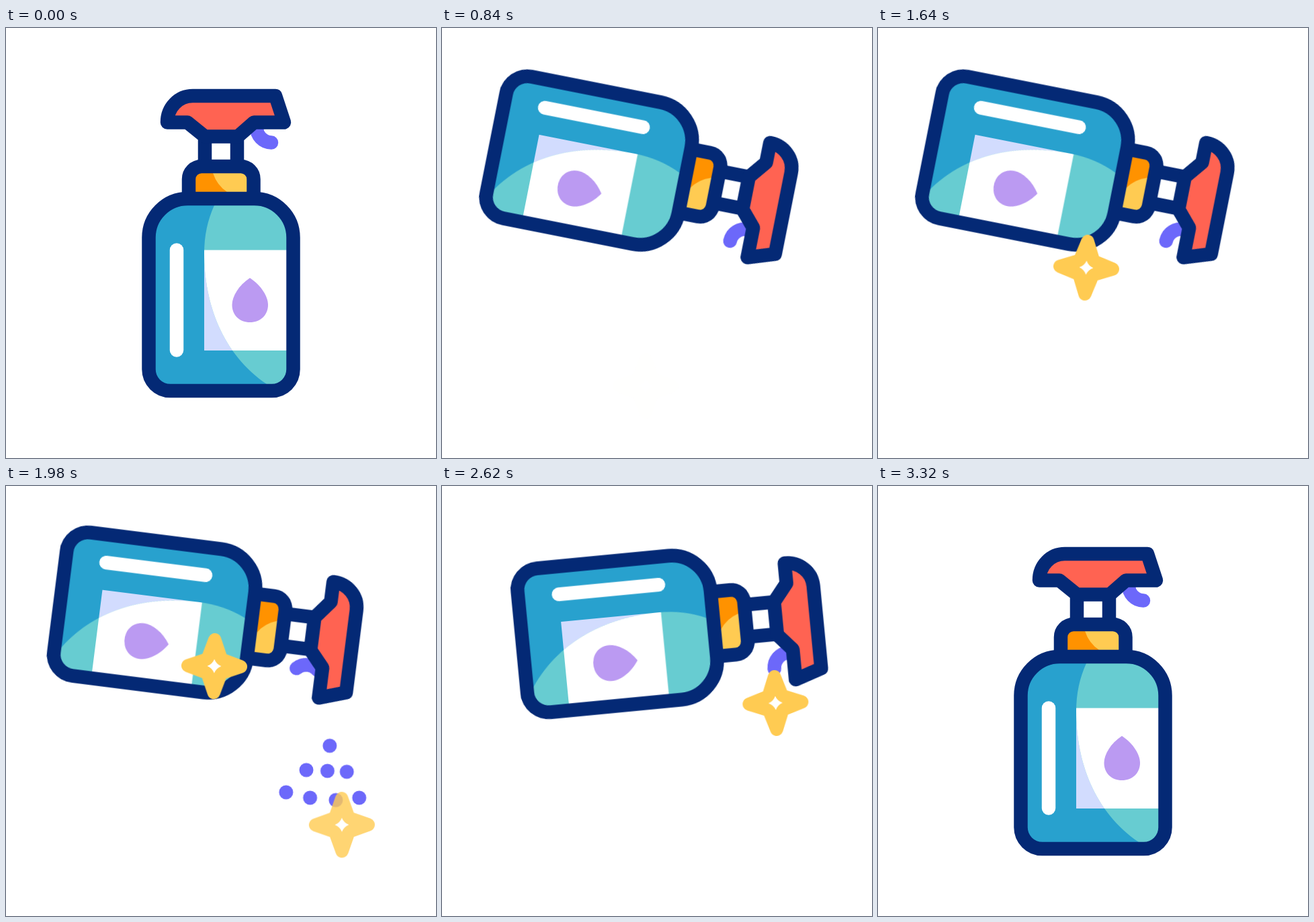
An HTML page that plays this animation: 640x640 px, repeating every 3600 ms.

```html
<!DOCTYPE html>
<html lang="en">
<head>
<meta charset="utf-8">
<title>Spray bottle</title>
<style>
  html, body { margin: 0; width: 100%; height: 100%; overflow: hidden; background: #fff; }
  svg { display: block; width: 100vw; height: 100vh; }

  .outline { fill: none; stroke: #042975; stroke-width: 20.5; stroke-linejoin: round; }
  .bottle, .trigger, .star, .dots circle { animation: 3600ms linear infinite; }

  .bottle {
    transform-origin: 320px 537px;
    animation-name: tip;
    animation-timing-function: ease-in-out;
  }
  @keyframes tip {
    0%, 84.778%, 100% { transform: translate(0, 0) rotate(0deg); }
    16.667%, 23.333%, 36.111%, 47.222%, 60%, 68.111% {
      transform: translate(-236.2px, -364.7px) rotate(101.2deg);
    }
    28.889%, 52.778% { transform: translate(-236.2px, -364.7px) rotate(96.2deg); }
  }

  .trigger {
    transform-origin: 374px 148px;
    animation-name: squeeze;
    animation-timing-function: ease-in-out;
  }
  @keyframes squeeze {
    0%, 23.333%, 37.222%, 47.222%, 61.111%, 100% { transform: rotate(0deg); }
    27.778%, 32.778%, 51.667%, 56.667% { transform: rotate(42deg); }
  }

  .dots circle { fill: #6c68fa; animation-name: spray; }
  @keyframes spray {
    0%, 24.43%, 39.444%, 48.32%, 63.333%, 100% {
      transform: translate(var(--x), calc(var(--y) + 62px)) scale(0);
    }
    24.444%, 48.333% { transform: translate(487px, 316px) scale(1); }
    32.222%, 56.111% { transform: translate(var(--x), var(--y)) scale(1); }
  }

  .star { fill: #fff; stroke: #ffcb52; stroke-width: 19.4; stroke-linejoin: round; }
  .left { animation-name: rise-left, fade-left; }
  .right { animation-name: rise-right, fade-right; }
  @keyframes rise-left {
    0%, 23.333% { transform: translate(303px, 533px) rotate(0deg); }
    32.222% { transform: translate(304px, 462.5px) rotate(1.5deg); }
    45.556% { transform: translate(310px, 357px) rotate(3deg); }
    63.889% { transform: translate(310px, 185px) rotate(-.8deg); }
    67.222%, 100% { transform: translate(310px, 152px) rotate(-1.5deg); }
  }
  @keyframes fade-left {
    0%, 23.333%, 67.222%, 100% { opacity: 0; }
    26.111%, 60.556% { opacity: 1; }
  }
  @keyframes rise-right {
    0%, 52.778% { transform: translate(500px, 528px) rotate(0deg); }
    63.889% { transform: translate(499.5px, 411px) rotate(-1.5deg); }
    78.333% { transform: translate(494.5px, 268.5px) rotate(-3deg); }
    92.222%, 100% { transform: translate(494.5px, 133px) rotate(.8deg); }
  }
  @keyframes fade-right {
    0%, 52.778%, 92.222%, 100% { opacity: 0; }
    55.556%, 85.556% { opacity: 1; }
  }
</style>
</head>
<body>
<svg viewBox="0 0 640 640">
  <defs>
    <path id="body" d="M212.5 312A58 58 0 0 1 270.5 254H369.5A58 58 0 0 1 427.5 312V508A32 32 0 0 1 395.5 540H244.5A32 32 0 0 1 212.5 508Z"/>
    <path id="cap" d="M272 254V225A19 19 0 0 1 291 206H349.5A19 19 0 0 1 368.5 225V254"/>
    <path id="head" d="M240 140.5C240 118 257 101 278 101H401L414 140.5H369L345 161.5H296L270 140.5Z"/>
    <path id="spark" d="M0-39.3L9-14Q10.4-10.4 14-9L39.3 0L14 9Q10.4 10.4 9 14L0 39.3L-9 14Q-10.4 10.4-14 9L-39.3 0L-14-9Q-10.4-10.4-9-14Z"/>
    <clipPath id="inside"><use href="#body"/></clipPath>
    <clipPath id="lit">
      <path d="M314 254L310 264C300 286 295 309 295 335C295 410 322 485 388 530L404 542H430V254Z"/>
    </clipPath>
  </defs>

  <g class="dots">
    <circle r="10.5" style="--x:481px;--y:398px"/>
    <circle r="10.5" style="--x:440.5px;--y:440px"/>
    <circle r="10.5" style="--x:477px;--y:441.5px"/>
    <circle r="10.5" style="--x:510.5px;--y:443px"/>
    <circle r="10.5" style="--x:405.5px;--y:478.5px"/>
    <circle r="10.5" style="--x:447px;--y:488px"/>
    <circle r="10.5" style="--x:491.5px;--y:492px"/>
    <circle r="10.5" style="--x:532px;--y:488px"/>
  </g>

  <g class="bottle">
    <path class="trigger" d="M373 148A22.5 22.5 0 0 0 395 170.5" fill="none" stroke="#6c68fa" stroke-width="20.5" stroke-linecap="round"/>

    <path d="M296 160H344V206H296Z" fill="#fff"/>
    <path class="outline" d="M296 160V206M344 160V206"/>
    <use href="#head" fill="#ff6352"/>
    <use href="#head" class="outline"/>

    <use href="#cap" fill="#ff9200"/>
    <path d="M306 206L308 216Q314 234 329 244L340 254H366V206Z" fill="#ffcb52"/>
    <use href="#cap" class="outline"/>

    <g clip-path="url(#inside)">
      <path d="M205 250H435V545H205Z" fill="#28a1ce"/>
      <path d="M295 330.5H428V480H295Z" fill="#d2dcfe"/>
      <g clip-path="url(#lit)">
        <path d="M290 250H435V545H290Z" fill="#67ccd1"/>
        <path d="M290 330.5H428V480H290Z" fill="#fff"/>
      </g>
    </g>
    <path d="M254 330.5V479.5" stroke="#fff" stroke-width="20.5" stroke-linecap="round"/>
    <path d="M363 372C380 383 390 400 390 412C390 428 378 438 363 438S336.5 428 336.5 412C336.5 400 346 383 363 372Z" fill="#bb9af2"/>
    <use href="#body" class="outline"/>
  </g>

  <use href="#spark" class="star left"/>
  <use href="#spark" class="star right"/>
</svg>
</body>
</html>
```
